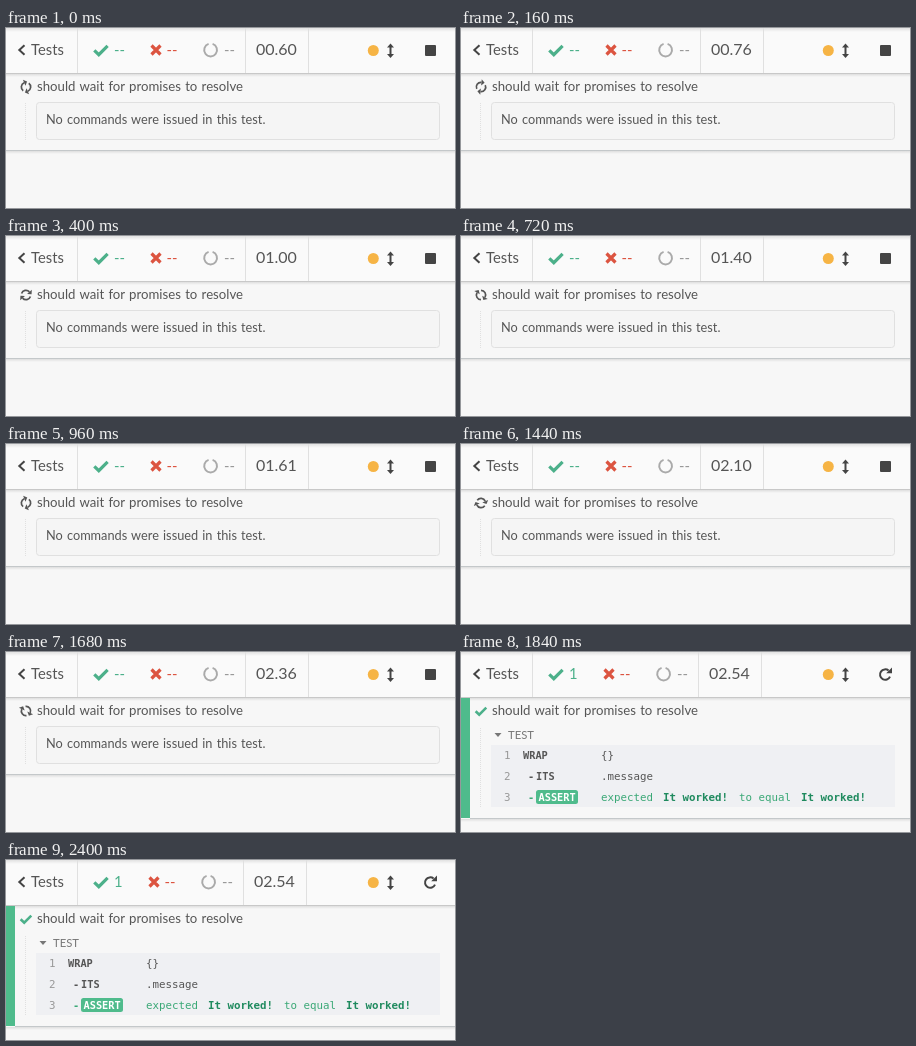
Write an HTML page that moves like this. It is 449 px wide and 180 px high and loops after 2720 ms.

```html
<!DOCTYPE html>
<html lang="en">
<head>
<meta charset="utf-8">
<title>Test runner</title>
<style>
  html, body { margin: 0; width: 100%; height: 100%; overflow: hidden; background: #f7f7f7; }
  svg { display: block; width: 449px; height: 180px; font-family: Lato, sans-serif; fill: #555; }
  text { white-space: pre; }
  .bar { font-size: 14.8px; }
  .time { font-size: 16px; }
  .title { font-size: 13.2px; word-spacing: .9px; }
  .note { font-size: 12.75px; word-spacing: .9px; }
  .log { font: 10.8px "DejaVu Sans Mono", monospace; }
  .name { font-size: 10.3px; font-weight: bold; }
  .small { font-size: 11.3px; }
  .mute { fill: #999; }
  .pass { fill: #4cb08a; }
  .fail { fill: #dc5440; }
  .green { fill: #3aa876; }
  .bold { font-weight: bold; fill: #1f8a5e; }
  .line { fill: none; stroke: #e0e0e0; }
  .stroke { fill: none; stroke-width: 2; }
</style>
</head>
<body>
<svg viewBox="0 0 449 180">
  <defs>
    <linearGradient id="shade" x2="0" y2="1">
      <stop stop-color="#000" stop-opacity=".1"/>
      <stop offset="1" stop-color="#000" stop-opacity="0"/>
    </linearGradient>
    <path id="check" d="M-6.7 .3L-2.2 4.7L6.6 -4.2" fill="none" stroke="#4cb08a" stroke-width="3.2"/>
    <g id="half">
      <path d="M-4.5 -1.2A4.6 4.6 0 0 1 3.2 -3.3" fill="none" stroke="#555" stroke-width="1.7"/>
      <path d="M5.5 -5.5V-1H1Z"/>
    </g>
  </defs>

  <rect width="449" height="180" fill="#f7f7f7"/>
  <rect width="449" height="45" fill="#fafafa"/>
  <rect width="449" height="4" fill="url(#shade)"/>
  <rect y="46" width="449" height="3" fill="url(#shade)"/>
  <path d="M0 45.5H449" stroke="#c8c8c8"/>

  <path d="M18.5 17.2L13.3 22L18.5 26.8" class="stroke" stroke="#444"/>
  <text x="25" y="27" class="bar">Tests</text>
  <path d="M71.5 0V45" class="line"/>
  <use href="#check" x="95" y="22"/>
  <text id="passed" x="108" y="27" class="bar pass"></text>
  <g id="stats">
    <path d="M145.5 17.5L154.5 26.5M154.5 17.5L145.5 26.5" class="stroke" stroke="#dc5440" style="stroke-width:3.2"/>
    <text x="160.5" y="27" class="bar fail">--</text>
    <path d="M202.6 15.9A6.4 6.4 0 1 0 206.6 15.9" class="stroke" stroke="#aaa"/>
    <text x="218" y="27" class="bar mute">--</text>
    <path d="M239.5 0V45M302.5 0V45" class="line"/>
    <text id="time" x="250" y="27" class="time"></text>
  </g>
  <circle cx="367.3" cy="22.5" r="5.5" fill="#f6b445"/>
  <path d="M384.5 15.5L388 19.5H385.5V26H388L384.5 30L381 26H383.5V19.5H381Z" fill="#444"/>

  <text x="31" y="63" class="title">should wait for promises to resolve</text>

  <g id="running">
    <rect x="419" y="17" width="11" height="11" rx="1" fill="#444"/>
    <g id="spinner"><use href="#half"/><use href="#half" transform="rotate(180)"/></g>
    <path d="M19.5 75V112" class="line" stroke-dasharray="1 1"/>
    <rect x="30.5" y="74.5" width="403" height="37" rx="3" fill="#f5f5f5" stroke="#e0e0e0"/>
    <text x="40" y="96" class="note">No commands were issued in this test.</text>
    <path d="M0 122.5H449" stroke="#c4c8ca"/>
    <rect y="123" width="449" height="3" fill="url(#shade)"/>
  </g>

  <g id="done">
    <path d="M427.6 18.6A5.2 5.2 0 1 0 429 24.6" class="stroke" stroke="#444"/>
    <path d="M431 15.5V21.3H425.2Z" fill="#444"/>
    <rect y="46" width="9" height="120" fill="#4fbb8c"/>
    <use href="#check" transform="translate(20 59) scale(.8)"/>
    <path d="M19.5 76V156" class="line" stroke-dasharray="1 1"/>
    <path d="M33.5 81H40.5L37 85Z" fill="#777"/>
    <text x="47" y="87" class="small" fill="#777">TEST</text>
    <rect x="30" y="93" width="404" height="62" fill="#eff0f3"/>
    <g class="log">
      <text x="43" y="107" class="mute">1</text>
      <text x="62" y="107" class="name">WRAP</text>
      <text x="140" y="107">{}</text>
      <text x="43" y="127.5" class="mute">2</text>
      <text x="67" y="127.5" class="name">-</text>
      <text x="75" y="127.5" class="name">ITS</text>
      <text x="140" y="127.5">.message</text>
      <text x="43" y="148.5" class="mute">3</text>
      <text x="67" y="148.5" class="name green">-</text>
      <rect x="75" y="138" width="42" height="14" rx="2.5" fill="#4fbb8c"/>
      <text x="77.5" y="148.7" class="name" style="fill:#fff">ASSERT</text>
      <text x="140" y="148.5" class="green">expected</text>
      <text x="202" y="148.5" class="bold">It worked!</text>
      <text x="278" y="148.5" class="green">to equal</text>
      <text x="340" y="148.5" class="bold">It worked!</text>
    </g>
    <path d="M9 166.5H449" stroke="#c4c8ca"/>
    <rect y="167" width="449" height="3" fill="url(#shade)"/>
  </g>
</svg>
<script>
  const LOOP = 2720, STEP = 80, END = 1840;
  // Clock readings [ms, seconds], linear in between
  const clock = [[0, .6], [400, 1], [720, 1.4], [960, 1.61], [1440, 2.1], [END, 2.54]];
  const get = id => document.getElementById(id);
  const show = (id, on) => get(id).setAttribute('display', on ? 'inline' : 'none');

  function seconds(t) {
    if (t >= END) return 2.54;
    const i = clock.findIndex(p => p[0] > t);
    const [t0, s0] = clock[i - 1], [t1, s1] = clock[i];
    return s0 + (s1 - s0) * (t - t0) / (t1 - t0);
  }

  function draw(now) {
    const t = Math.floor(now % LOOP / STEP) * STEP;
    const done = t >= END, s = seconds(t);
    show('running', !done);
    show('done', done);
    get('time').textContent = s.toFixed(2).padStart(5, '0');
    get('spinner').setAttribute('transform', `translate(20 59) rotate(${(s - .98) * 180})`);
    get('stats').setAttribute('transform', `translate(${done ? -2 : 0})`);
    get('passed').textContent = done ? '1' : '--';
  }

  const start = performance.now();
  function tick() {
    draw(performance.now() - start);
    requestAnimationFrame(tick);
  }
  tick();
</script>
</body>
</html>
```
